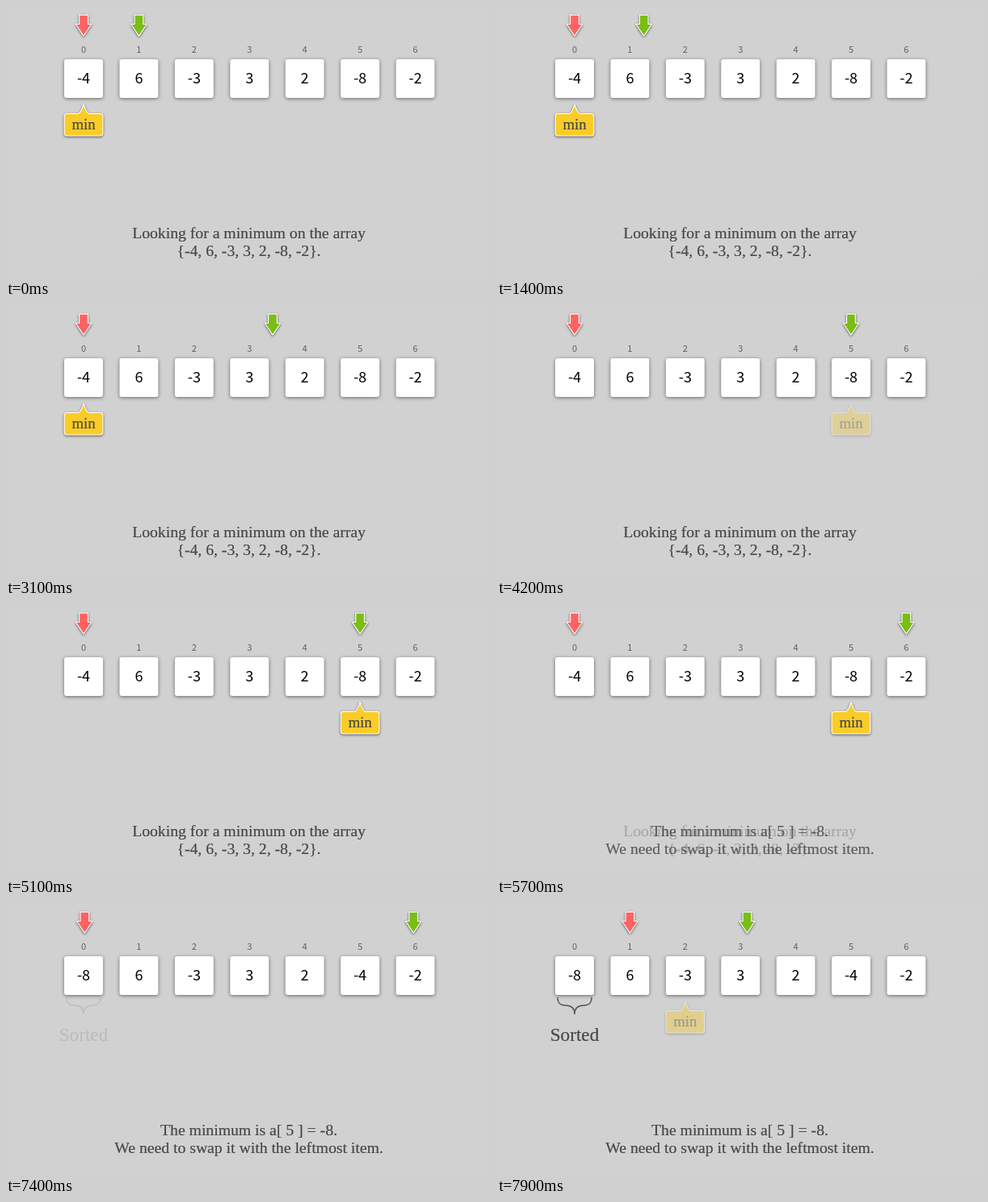
Animation of 600x336 px, one loop 8000 ms. Source, as an HTML page:

```html
<!DOCTYPE html>
<html lang="en">
<head>
<meta charset="utf-8">
<title>Selection sort</title>
<style>
  html, body { margin: 0; width: 100%; height: 100%; overflow: hidden; background: #d2d1d2; }
  svg { display: block; width: 600px; height: 336px; }
  text { text-anchor: middle; }
  .index { font: 500 11px 'Noto Sans CJK JP', 'Noto Sans CJK SC', 'Open Sans', sans-serif; fill: #606060; }
  .value { font: 18px 'Noto Sans CJK JP', 'Noto Sans CJK SC', 'Open Sans', sans-serif; fill: #000; }
  .serif { font: 19.7px 'Liberation Serif', serif; fill: #474747; stroke: #474747; stroke-width: .2; }
  .cell { fill: #fff; filter: drop-shadow(0 1.5px 2px rgba(0, 0, 0, .52)); }
  .marker { stroke: #fff; stroke-width: 2.2; stroke-linejoin: round; paint-order: stroke;
            filter: drop-shadow(0 1.2px 1.5px rgba(0, 0, 0, .6)); }
</style>
</head>
<body>
<svg viewBox="0 0 600 336">
  <defs>
    <linearGradient id="recess" x2="0" y2="1">
      <stop offset="0" stop-color="#a2a2a4"/>
      <stop offset=".07" stop-color="#cccbcc"/>
      <stop offset="1" stop-color="#d1d0d1"/>
    </linearGradient>
    <linearGradient id="rim" x2="0" y2="1">
      <stop offset="0" stop-color="#8c8c90"/>
      <stop offset=".15" stop-color="#acabad"/>
      <stop offset="1" stop-color="#b4b3b4"/>
    </linearGradient>
    <path id="arrow" class="marker" d="M-4.8 11.7H4.8V23H8.8L0 36.3L-8.8 23H-4.8Z"/>
  </defs>
  <g id="slots"></g>
  <g id="cells"></g>
  <g id="values"></g>
  <use id="red" href="#arrow" fill="#fe6262"/>
  <use id="green" href="#arrow" fill="#7abd14"/>
  <g id="min">
    <path class="marker" fill="#facc28" d="M0 123.2Q-2 131 -6 134H-20.3Q-23.3 134 -23.3 137V157.5Q-23.3 160.5 -20.3 160.5H20.3Q23.3 160.5 23.3 157.5V137Q23.3 134 20.3 134H6Q2 131 0 123.2Z"/>
    <text class="serif" y="152.6" style="font-size:18.7px">min</text>
  </g>
  <g id="sorted">
    <path d="M75 117C75 126 80 127 85 127S96 129 96 138C96 129 102 127 107 127S117 126 117 117" fill="none" stroke="#555" stroke-width="1.5"/>
    <text class="serif" x="96" y="171" style="font-size:23.2px">Sorted</text>
  </g>
  <g id="search" class="serif">
    <text x="300.5" y="288">Looking for a minimum on the array</text>
    <text x="300.5" y="310">{-4, 6, -3, 3, 2, -8, -2}.</text>
  </g>
  <g id="result" class="serif">
    <text x="300.5" y="288">The minimum is a[ 5 ] = -8.</text>
    <text x="300.5" y="310">We need to swap it with the leftmost item.</text>
  </g>
</svg>
<script>
const LOOP = 8000;
const numbers = [-4, 6, -3, 3, 2, -8, -2];
const $ = id => document.getElementById(id);
const columnX = column => 96 + column * 68.4;

// Keyframes are [time, value] pairs; a repeated time makes a hard change.
const greenColumn = [[1325, 1], [1625, 2], [2150, 2], [2450, 3], [2975, 3], [3275, 4],
  [3800, 4], [4100, 5], [5210, 5], [5510, 6], [7395, 6], [8098, 2]];
const redColumn = [[7395, 0], [7700, 1]];
const minColumn = [[4100, 0], [4100, 5], [7300, 5], [7300, 2]];
const minOpacity = [[4100, 1], [4100, 0], [4400, 1], [6750, 1], [6950, 0], [7780, 0], [8080, 1]];
const searchOpacity = [[5490, 1], [5790, 0]];
const resultOpacity = [[5450, 0], [5750, 1]];
const swapProgress = [[6775, 0], [7290, 1]];
const sortedOpacity = [[7350, 0], [7700, 1]];

function valueAt(keys, t) {
  const next = keys.findIndex(([time]) => time > t);
  if (next < 0) return keys[keys.length - 1][1];
  if (next === 0) return keys[0][1];
  const [t0, v0] = keys[next - 1], [t1, v1] = keys[next];
  return v0 + (v1 - v0) * (t - t0) / (t1 - t0);
}

function add(parent, tag, attributes, content = '') {
  const element = document.createElementNS('http://www.w3.org/2000/svg', tag);
  for (const name in attributes) element.setAttribute(name, attributes[name]);
  element.textContent = content;
  $(parent).append(element);
  return element;
}

function place(element, column) {
  element.setAttribute('transform', `translate(${columnX(column)} 0)`);
}

const items = numbers.map((number, column) => {
  place(add('slots', 'text', { class: 'index', y: 58 }, column), column);
  place(add('slots', 'rect', { x: -23.5, y: 66.5, width: 47, height: 47, rx: 3,
    fill: 'url(#recess)', stroke: 'url(#rim)' }), column);
  const cell = add('cells', 'rect', { class: 'cell', x: -24, y: 66, width: 48, height: 48, rx: 3 });
  $('cells').prepend(cell); // left cells lie over right ones
  const parts = [cell, add('values', 'text', { class: 'value', y: 96 }, number)];
  parts.forEach(part => place(part, column));
  return parts;
});

function draw(now) {
  const t = now % LOOP;
  place($('green'), valueAt(greenColumn, t));
  place($('red'), valueAt(redColumn, t));
  place($('min'), valueAt(minColumn, t));
  $('min').style.opacity = valueAt(minOpacity, t);
  $('sorted').style.opacity = valueAt(sortedOpacity, t);
  $('search').style.opacity = valueAt(searchOpacity, t);
  $('result').style.opacity = valueAt(resultOpacity, t);

  const shift = 5 * valueAt(swapProgress, t);
  items[0].forEach(part => place(part, shift));
  items[5].forEach(part => place(part, 5 - shift));
}

const start = performance.now();
function tick() {
  draw(performance.now() - start);
  requestAnimationFrame(tick);
}
tick();
</script>
</body>
</html>
```
